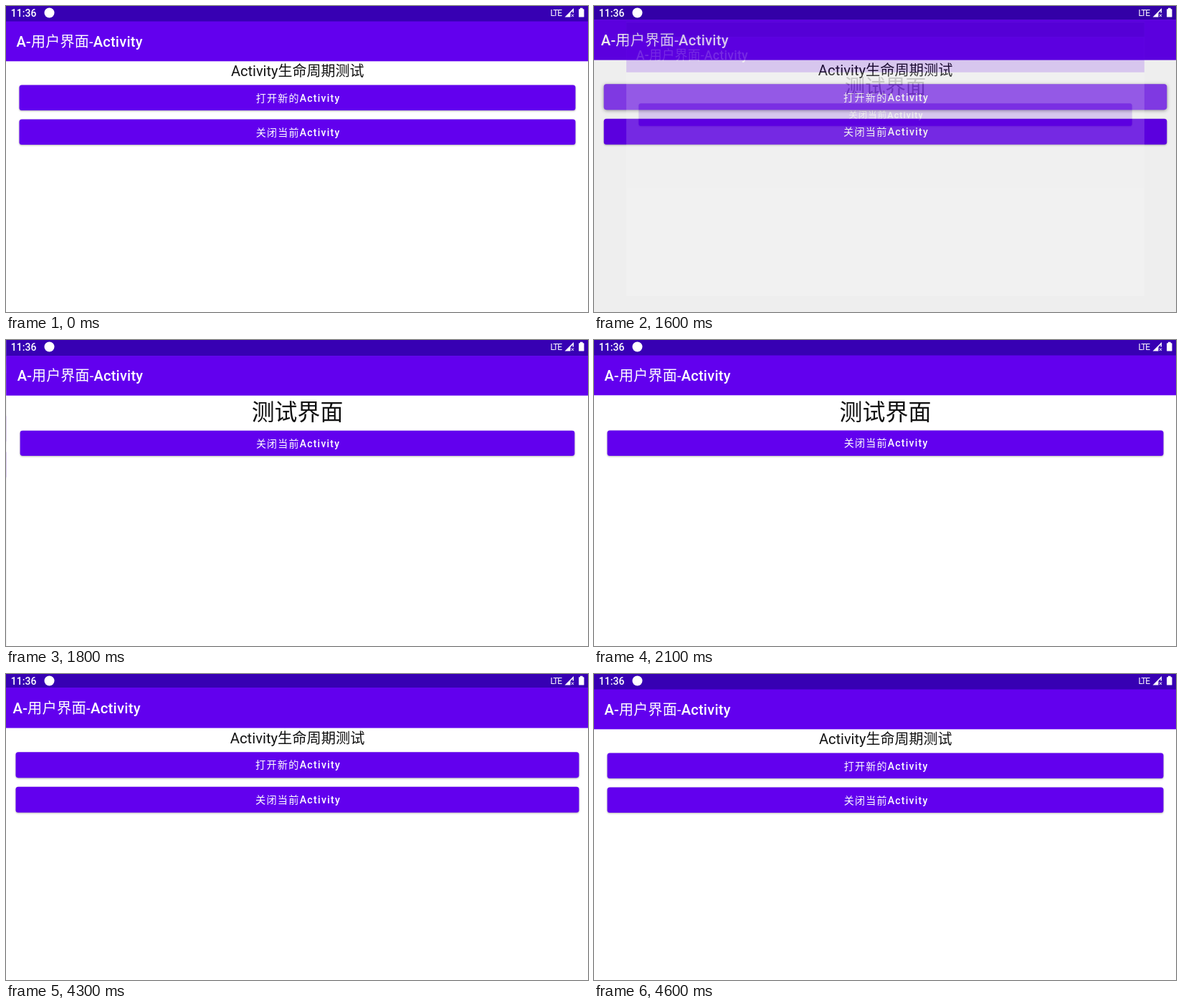
Write an HTML page that moves like this. It is 812 px wide and 428 px high and loops after 5700 ms.

```html
<!DOCTYPE html>
<html lang="zh-CN">
<head>
<meta charset="utf-8">
<title>Activity</title>
<style>
  html, body { margin: 0; width: 100%; height: 100%; overflow: hidden; background: #fff; }
  svg { display: block; width: 100%; height: 100%; }
  text { font-family: Roboto, "Noto Sans CJK SC", "Noto Sans CJK", sans-serif; fill: #fff; white-space: pre; }
  .latin { font-weight: 500; }
  .title { font-size: 20px; letter-spacing: .25px; }
  .label { font-size: 14px; letter-spacing: 1.25px; text-anchor: middle; }
  .head { fill: #111; text-anchor: middle; }
  .button { fill: #6200ee; filter: drop-shadow(0 1px 1px rgba(0, 0, 0, .3)); }
  .raised { filter: drop-shadow(0 1px 2.5px rgba(0, 0, 0, .4)); }
</style>
</head>
<body>
<svg viewBox="0 0 812 428" xmlns="http://www.w3.org/2000/svg">
  <g id="stage"></g>
  <g id="status" fill="#fff">
    <text x="6.8" y="14.6" font-size="14" class="latin">11:36</text>
    <circle cx="60.5" cy="9.5" r="7"/>
    <text x="759.5" y="13.6" font-size="12" letter-spacing="-1.1">LTE</text>
    <path d="M779.5 15.5L792 3V9.5H790.5V6.8L787.5 9.8V15.5Z"/>
    <path d="M789 11.5l3 3.5m0-3.5l-3 3.5" stroke="#fff" fill="none"/>
    <path d="M801 2.8h3.6v1.4h1.2q.7 0 .7.7v10q0 .7-.7.7h-6q-.7 0-.7-.7v-10q0-.7.7-.7h1.2z"/>
  </g>
</svg>
<script>
const LOOP = 5700, STEP = 100;
const OPEN = 1542, CLOSE = 4166, SPAN = 400;
const CX = 406.5, CY = 214;
const stage = document.getElementById('stage');
const clamp = v => Math.max(0, Math.min(1, v));

const mixed = (cjk, before, after) =>
  `<tspan class="latin">${before}</tspan>${cjk}<tspan class="latin">${after}</tspan>`;

// ripple: { to: right edge, alpha: white overlay }
function button(y, cjk, ripple) {
  const light = ripple
    ? `<path d="M22 ${y}H${ripple.to}v35.5H22q-3.5 0-3.5-3.5v-28.5q0-3.5 3.5-3.5z" fill="#fff" opacity="${ripple.alpha}"/>`
    : '';
  return `<rect class="button${ripple ? ' raised' : ''}" x="18.5" y="${y}" width="776" height="35.5" rx="3.5"/>${light}
    <text class="label" x="407.6" y="${y + 23}">${mixed(cjk, '', 'Activity')}</text>`;
}

function screen(content, scale = 1, alpha = 1) {
  return `<g opacity="${alpha}" transform="translate(${CX} ${CY}) scale(${scale}) translate(${-CX} ${-CY})">
    <rect x="-1" y="-2" width="815" height="432" fill="#fff"/>
    <rect x="-1" y="-2" width="815" height="24" fill="#3700b3"/>
    <rect x="-1" y="21.5" width="815" height="55.8" fill="#6200ee"/>
    <text class="title" x="14.5" y="56.8">${mixed('用户界面-', 'A-', 'Activity')}</text>
    ${content}</g>`;
}

const home = ripple =>
  `<text class="head" x="406.7" y="98.3" font-size="20">Activity生命周期测试</text>`
  + button(110.5, '打开新的', ripple) + button(158.5, '关闭当前');

const detail = ripple =>
  `<text class="head" x="406.5" y="111.8" font-size="32">测试界面</text>`
  + button(126.4, '关闭当前', ripple);

const cubic = (a, b, c, d, u) => {
  const v = 1 - u;
  return a * v * v * v + 3 * b * u * v * v + 3 * c * u * u * v + d * u * u * u;
};

// Fast out, extra slow in: two joined Bézier segments
function ease(x) {
  if (x <= 0 || x >= 1) return clamp(x);
  const [xs, ys] = x < 1 / 6
    ? [[0, .05, .13333, 1 / 6], [0, 0, .06, .4]]
    : [[1 / 6, .20833, .25, 1], [.4, .82, 1, 1]];
  let lo = 0, hi = 1;
  for (let i = 0; i < 24; i++) {
    const mid = (lo + hi) / 2;
    if (cubic(...xs, mid) < x) lo = mid; else hi = mid;
  }
  return cubic(...ys, lo);
}

function opening(e) {
  const p = ease(e / SPAN), alpha = clamp((e - 50) / 50);
  const ripple = e < 0 ? { to: 538, alpha: .17 } : { to: 794.5, alpha: .24 };
  const shade = `<rect width="812" height="428" opacity="${.27 * p}"/>`;
  const edge = alpha === 1 ? '<rect x="807" y="22" width="5" height="406"/>' : '';
  return screen(home(ripple), 1 + .05 * p) + shade + edge
    + screen(detail(), .85 + .15 * p, alpha);
}

function closing(e) {
  const p = ease(e / SPAN), alpha = 1 - clamp((e - 35) / 50);
  const top = alpha > 0
    ? screen(detail({ to: 699.5, alpha: .24 }), 1 - .1 * p, alpha) : '';
  return screen(home(), 1.1 - .1 * p) + top;
}

function scene(t) {
  if (t < 1500) return screen(home());
  if (t < OPEN + SPAN) return opening(t - OPEN);
  if (t < CLOSE) return screen(detail());
  return closing(t - CLOSE);
}

const start = performance.now();
let shown = -1;
function tick() {
  const t = Math.floor((performance.now() - start) % LOOP / STEP) * STEP;
  if (t !== shown) stage.innerHTML = scene(shown = t);
  requestAnimationFrame(tick);
}
tick();
</script>
</body>
</html>
```
